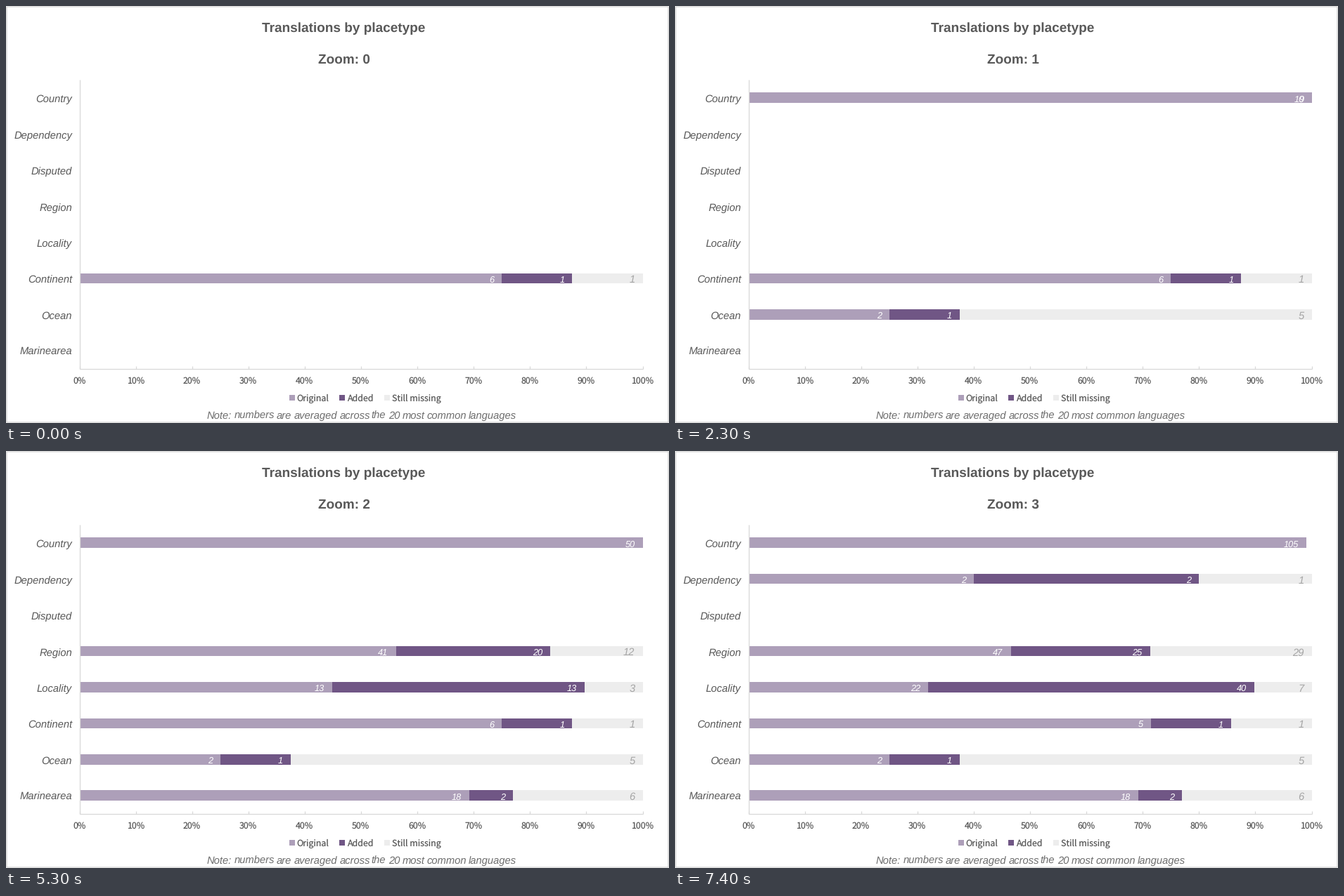
A matplotlib script that plays this animation: 943 px wide and 594 px high, repeating every 8 s.

```python
import matplotlib.pyplot as plt
from matplotlib.animation import FuncAnimation
from matplotlib.patches import Rectangle

W, H, DPI = 943, 594, 64
LEFT, TOP, BASE = 105, 105, 516.5
SCALE = 8.005               # pixels per percent
PITCH = 51.43
BAR_H = 14.6
LIGHT, DARK, PALE = "#ad9fb9", "#705685", "#ededed"
TEXT, LINE, FAINT = "#595959", "#d9d9d9", "#a6a6a6"
SANS, HUMANIST = "Liberation Sans", "Noto Sans CJK JP"

PLACES = ["Country", "Dependency", "Disputed", "Region",
          "Locality", "Continent", "Ocean", "Marinearea"]

# counts in legend order for each zoom level
ZOOMS = [
    {"Continent": (6, 1, 1)},
    {"Country": (10, 0, 0), "Continent": (6, 1, 1), "Ocean": (2, 1, 5)},
    {"Country": (50, 0, 0), "Region": (41, 20, 12), "Locality": (13, 13, 3),
     "Continent": (6, 1, 1), "Ocean": (2, 1, 5), "Marinearea": (18, 2, 6)},
    {"Country": (105, 0, 1), "Dependency": (2, 2, 1), "Region": (47, 25, 29),
     "Locality": (22, 40, 7), "Continent": (5, 1, 1), "Ocean": (2, 1, 5),
     "Marinearea": (18, 2, 6)},
]
STARTS = [0, 1, 7, 13]      # first half-second step of each zoom level
STEPS = 16

plt.rcParams["text.hinting"] = "none"
fig = plt.figure(figsize=(W / DPI, H / DPI), dpi=DPI, facecolor="white")
ax = fig.add_axes([0, 0, 1, 1])
ax.set_xlim(0, W)
ax.set_ylim(H, 0)
ax.axis("off")


def pt(px):
    return px * 72 / DPI


def label(x, y, s, size, color=TEXT, ha="left", font=SANS, **style):
    return ax.text(x, y, s, fontsize=pt(size), color=color, ha=ha,
                   va="baseline", family=font, **style)


def box(x, y, w, h, color):
    return ax.add_patch(Rectangle((x, y), w, h, fc=color, lw=0, zorder=2))


def line(xs, ys):
    ax.plot(xs, ys, color=LINE, lw=pt(1.3), zorder=3, solid_capstyle="butt")


def row_y(place):
    return TOP + PITCH * (PLACES.index(place) + 0.5)


def draw_static():
    ax.add_patch(Rectangle((0.75, 0.75), W - 1.75, H - 1.75, fill=False,
                           ec=LINE, lw=pt(1.6)))
    label(480.5, 37, "Translations by placetype", 19, ha="center",
          weight="bold")
    for place in PLACES:
        label(94, row_y(place) + 6.6, place, 14.8, ha="right", style="italic")

    line([LEFT, LEFT], [TOP, BASE])
    line([LEFT, LEFT + 100 * SCALE], [BASE, BASE])
    for p in range(0, 101, 10):
        x = LEFT + p * SCALE
        line([x, x], [BASE - 4, BASE])
        label(x - 0.5, 537.5, f"{p}%", 12.4, ha="center", font=HUMANIST)

    for x, tx, name, color in [(403, 413.5, "Original", LIGHT),
                               (474, 485, "Added", DARK),
                               (538, 549, "Still missing", PALE)]:
        box(x, 554, 8, 8, color)
        label(tx, 563, name, 12.4, font=HUMANIST)

    words = "Note: numbers are averaged across the 20 most common languages"
    starts = [286, 324.5, 384.5, 409.5, 474.5, 519.3, 543.8, 564, 598.7, 658]
    for x, word in zip(starts, words.split()):
        label(x, 588, word, 14.8, "#6e6e6e", style="italic")


def draw_row(place, values):
    y = row_y(place)
    total, done = sum(values), 0
    parts = []
    for value, color in zip(values, (LIGHT, DARK, PALE)):
        # the missing share of countries stays blank
        if not value or (place == "Country" and color == PALE):
            continue
        x0 = LEFT + 100 * SCALE * done / total
        done += value
        x1 = LEFT + 100 * SCALE * done / total
        parts.append(box(x0, y - BAR_H / 2, x1 - x0, BAR_H, color))
        pale = color == PALE
        parts.append(label(x1 - 11, y + (6.4 if pale else 5.8), str(value),
                           14.8 if pale else 12.7,
                           FAINT if pale else "white", "right",
                           style="italic"))
    return parts


def draw_zoom(zoom):
    parts = [label(480.5, 81.5, f"Zoom: {zoom}", 19, ha="center",
                   weight="bold")]
    for place, values in ZOOMS[zoom].items():
        parts += draw_row(place, values)
    if zoom == 1:           # two labels collide at the end of this bar
        parts.append(label(LEFT + 100 * SCALE - 11, row_y("Country") + 5.8,
                           "9", 12.7, "white", "right", style="italic"))
    return parts


draw_static()
layers = [draw_zoom(z) for z in range(len(ZOOMS))]


def update(step):
    current = max(z for z, start in enumerate(STARTS) if step >= start)
    for z, parts in enumerate(layers):
        for part in parts:
            part.set_visible(z == current)
    return [part for parts in layers for part in parts]


update(0)
anim = FuncAnimation(fig, update, frames=STEPS, interval=500, repeat=True,
                     repeat_delay=0, blit=False)
plt.show()
```
